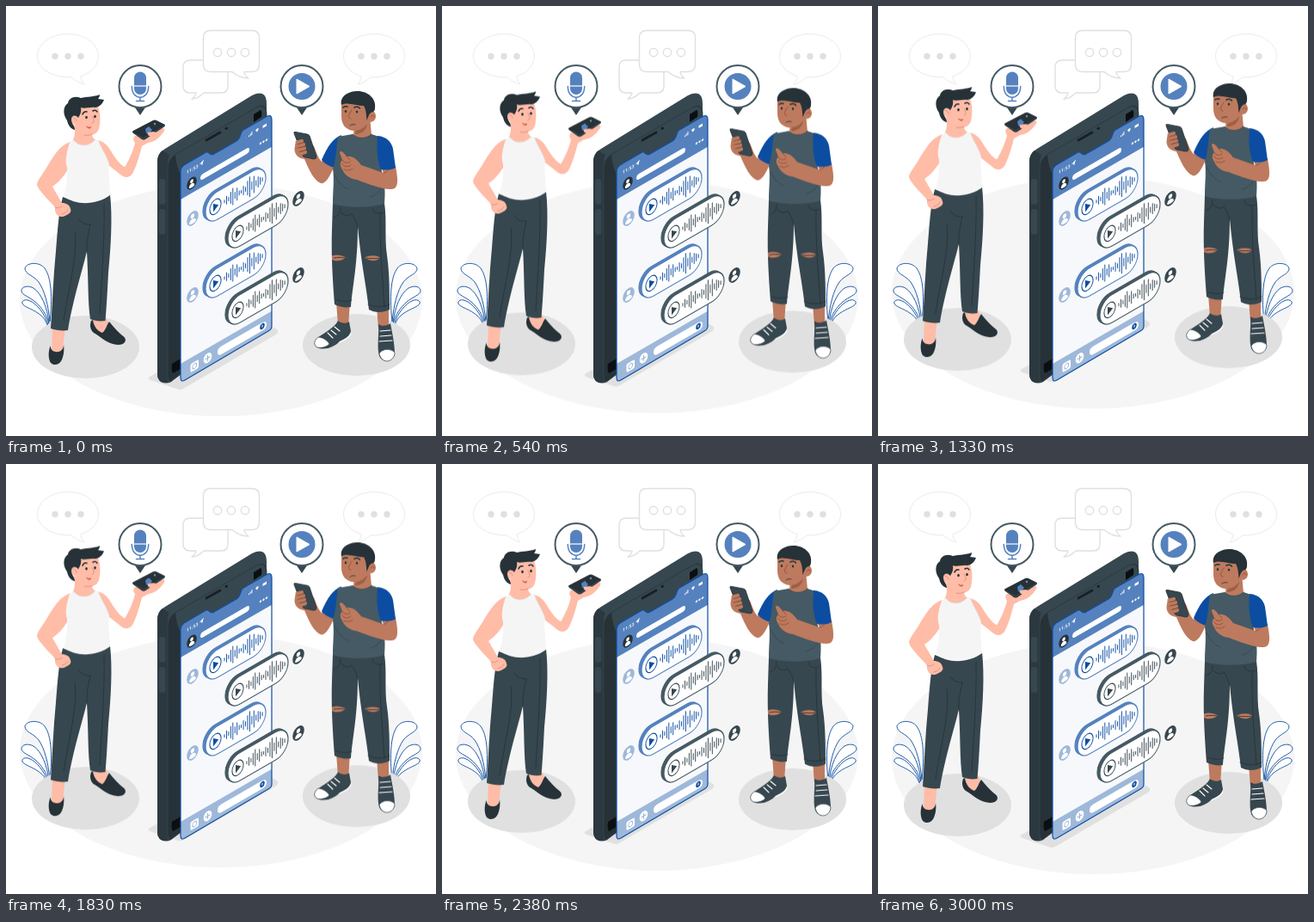
These frames come from a looping animation (500x500 px, 3040 ms). An HTML page:

```html
<!DOCTYPE html>
<html lang="en">
<head>
<meta charset="utf-8">
<title>Voice messages</title>
<style>
html, body { margin: 0; width: 100%; height: 100%; overflow: hidden; background: #fff; }
svg { display: block; width: 100vw; height: 100vh; }
.float { animation: float 3040ms linear infinite; }
@keyframes float {
  0%, 98.68%, 100% { transform: translateY(0); }
  49.34% { transform: translateY(-10px); }
}
.ink { fill: #263238; }
.slate { fill: #37474f; }
.steel { fill: #455a64; }
.navy { fill: #0c4da2; }
.blue { fill: #5582be; }
.pale { fill: #9eb8da; }
.white { fill: #fff; }
.shade { fill: #e0e0e0; }
.fair { fill: #ffbca7; }
.tan { fill: #bd7a5e; }
.line { fill: none; stroke: #263238; stroke-width: .8; stroke-linecap: round; stroke-linejoin: round; }
.slot { stroke: #172126; stroke-width: 3; }
.fold { stroke: #dc8a75; }
.crease { stroke: #8f4d36; }
.seam { stroke: #37474f; }
.brow { stroke-width: 1.5; }
.lace { stroke: #fff; stroke-width: 1.1; }
.bubble { fill: #fff; stroke: #ebebeb; stroke-width: 1; }
.bubble.main { stroke: #e0e0e0; stroke-width: 1.4; stroke-linejoin: round; }
.leaf { fill: #fff; stroke: #0c4da2; stroke-width: .9; }
.pin { fill: #fff; stroke: #455a64; stroke-width: 2; }
</style>
</head>
<body>
<svg viewBox="0 0 500 500">
  <defs>
    <g id="chat">
      <path class="bubble" d="M76 82.8C80 86 85 90 91 91C88 88 87 84 87 81.5C99 78 107.500 69 107.500 58.500C107.500 44 91.600 32.500 72 32.500S36.500 44 36.500 58.500S54 83.500 76 82.800Z"/>
      <g class="shade"><circle cx="57" cy="58.500" r="3.700"/><circle cx="72" cy="58.500" r="3.700"/><circle cx="87" cy="58.500" r="3.700"/></g>
    </g>
    <g id="plant" class="leaf">
      <path d="M51 367C54 340 53 316 45 305C39 297 24 298 22 305C22 312 32 313 38 321C45 331 49 347 51 367Z"/>
      <path d="M50 369C48 350 41 334 32 328C24 324 18 327 18 331C18 336 27 338 34 344C42 351 47 359 50 369Z"/>
      <path d="M49 370C44 356 35 346 28 343C22 340 18 343 19 346C21 350 30 352 37 357C43 361 46 365 48 371Z"/>
    </g>
    <g id="person"><circle cy="-2.600" r="2.500"/><path d="M-4.300 4.700C-4.300 -1 4.300 -1 4.300 4.700C2 6.300 -2 6.300 -4.300 4.700Z"/></g>
    <path id="pane" d="M203 193Q203 188 207 185L231 171Q234 169 236 171Q238 174 242 172L268 157Q272 154 273 149Q274 145 278 143L304 128Q309 126 309 132V372Q309 376 305 378L208 435Q203 438 203 432Z"/>
    <clipPath id="glass"><use href="#pane"/></clipPath>
  </defs>

  <use href="#chat"/>
  <use href="#chat" transform="matrix(-1 0 0 1 500 0)"/>
  <path class="bubble main" d="M214 63H250Q258 63 258 71V93Q258 101 250 101H230C226 105 221 108 216 108C219 106 220.500 104 221 101H214Q206 101 206 93V71Q206 63 214 63Z"/>
  <path class="bubble main" d="M238 28.500H286Q294.500 28.500 294.500 37V68Q294.500 76.500 286 76.500H277C277.500 80 279 82 282 84C274 84 268 81 263 76.500H238Q229.500 76.500 229.500 68V37Q229.500 28.500 238 28.500Z"/>
  <g class="bubble main"><circle cx="246" cy="54" r="4.700"/><circle cx="262" cy="54" r="4.700"/><circle cx="278" cy="54" r="4.700"/></g>

  <ellipse class="float" cx="250" cy="342" rx="234" ry="135" fill="#f5f5f5"/>
  <use href="#plant"/>
  <use href="#plant" transform="matrix(-1 0 0 1 500 0)"/>
  <g class="float shade">
    <ellipse cx="92.500" cy="396.500" rx="62.500" ry="36.500"/>
    <ellipse cx="407.500" cy="394" rx="62.500" ry="36"/>
    <path d="M167 431L290 362L315 376Q318 379 314 382L206 445Q202 447 198 445L168 435Q164 433 167 431Z"/>
  </g>

  <!-- handset -->
  <path class="slate" d="M176 181Q176 171 185 166L286 104Q303 96 303 114V370L204 428L192 437Q186 440 180 437Q176 434 176 428Z"/>
  <path fill="#2b383f" d="M176 181Q176 172 182 168L190 173Q188 177 188 184V438Q176 439 176 428Z"/>
  <path class="ink" stroke="#37474f" stroke-width=".8" d="M188 188Q188 178 197 172L290 118Q303 111 303 124V368L203 428L191 437Q188 437 188 430Z"/>
  <path class="slate" d="M197 173L290 119Q300 114 302 122V138L203 196Q198 186 197 173Z"/>
  <path fill="#0b0f12" d="M193 416L203 410V422L194 427Q192 424 193 416ZM288 126L296 121Q298 121 297 129L288 135Z"/>
  <path class="line slot" d="M233 156L249 147M256 142.500L256.500 142.200"/>
  <g class="slate"><rect x="178" y="201" width="7.500" height="30" rx="3.700"/><rect x="178" y="236" width="7.500" height="30" rx="3.700"/></g>

  <!-- screen -->
  <g clip-path="url(#glass)">
    <path fill="#f7f8fb" d="M200 120H312V440H200Z"/>
    <g transform="translate(203 190) skewY(-30)">
      <path class="blue" d="M-2 -8H108V35H-2Z"/>
      <path class="pale" d="M-2 226H108V252H-2Z"/>
    </g>
  </g>
  <use href="#pane" fill="none" stroke="#0c4da2" stroke-width="1.200"/>
  <g transform="translate(203 190) skewY(-30)">
    <text x="7" y="9.500" font-family="'Open Sans', sans-serif" font-size="5.300" font-weight="600" fill="#fff">11:53</text>
    <path class="white" d="M22 7L27 4L25 10L24.200 7.500Z"/>
    <path class="white" d="M79 8V6.500H80V8ZM80.700 8V5.300H81.700V8ZM82.400 8V4H83.400V8ZM87 5Q89 3 91 5L89 8ZM95.500 4.300H100V7.200H95.500Z"/>
    <g class="white"><circle cx="93" cy="23.500" r="1.200"/><circle cx="96.500" cy="23.500" r="1.200"/><circle cx="100" cy="23.500" r="1.200"/></g>
    <ellipse class="ink" cx="13" cy="23.500" rx="5.800" ry="6.800"/>
    <use href="#person" class="white" transform="translate(13 23.500) scale(.75 .85)"/>
    <rect class="white" x="23" y="20" width="57" height="6.500" rx="3"/>
    <g class="white">
      <rect x="11.500" y="233" width="9.500" height="10" rx="2"/>
      <ellipse cx="31.500" cy="237.500" rx="4.800" ry="5.600"/>
      <rect x="43" y="233" width="57" height="9.500" rx="4.500"/>
    </g>
    <ellipse cx="16.200" cy="238" rx="2.400" ry="2.800" fill="none" stroke="#9eb8da"/>
    <path d="M28.500 237.500H34.500M31.500 234V241" stroke="#9eb8da" stroke-width="1.200"/>
    <ellipse class="navy" cx="95" cy="237.300" rx="2.800" ry="3.400"/>
    <path d="M95 235.500V238.500" stroke="#fff" stroke-width="1"/>
  </g>
  <g id="messages" transform="translate(203 190) skewY(-30)"></g>

  <!-- left figure -->
  <g class="float">
    <path class="fair" d="M54 372L53 400C54 405 63 405 66 400L69 372ZM101 360L102 374C105 380 112 382 114 378L119 368L115 360Z"/>
    <path class="ink" d="M51.500 395C49 402 49 410 52 415C55 418 61 418 64 413C67 408 68 400 67 394C67 400 62 403 58 402C54 402 52 399 51.500 395ZM99 366C97 371 98 377 102 380C110 384 117 393 130 394C138 394 141 389 137.500 385C131 380 125 373 120 367C117 371 116 377 112 380C106 378 102 372 101 365Z"/>
    <path class="slate" d="M66 222C84 230 104 228 121 219C124 245 122 280 119 310C118 330 117 350 115.500 366C109 367 103 366 98 364C95 345 96 320 94 285C91 300 78 340 72 377C66 378 58 377 52 375C54 345 55 315 58 285C60 262 61 240 66 222Z"/>
    <path class="line" d="M94 287C93 276 96 264 98 254M80 262C84 290 72 330 67 366M114 230C115 270 111 320 109 358M98 254C90 254 86 251 84 247"/>
    <path class="fair" d="M75 158C64 161 57 172 50 183C44 194 37 202 36 207C36 213 52 228 57 234C56 240 60 246 66 245C72 243 77 240 75 236C74 231 70 229 65 229L54 210C60 206 68 198 73 188Z"/>
    <path class="line fold" d="M57 234C60 236 63 234 65 233M65 242C69 241 71 239 72 237"/>
    <path class="fair" d="M104 156C114 156 119 163 124 172C130 181 136 187 138.500 187C143 179 148 168 150 159C147 155 148 150 153 151C161 148 169 148 174 146C184 139 187 143 182 148C178 154 172 158 165 159L158 163C155 175 151 188 147 195C143 200 138 200 133 196C127 191 119 185 113 180Z"/>
    <path class="fair" d="M79 138C81 147 80 152 77 158C84 166 98 165 106 157C102 155 100 152 100 149Z"/>
    <path fill="#f5f5f5" d="M74 159L79 156C84 164 97 164 104 155L108 157C110 165 117 173 120 184C118 195 121 208 121 220C106 231 82 233 67 221C70 212 72 199 71 188C68 179 71 168 74 159Z"/>
    <path d="M79 156C84 164 97 164 104 155M108 157C110 165 117 173 120 184" fill="none" stroke="#dedede" stroke-width=".7"/>
    <path class="fair" d="M79 118C88 112 103 113 107 117C110 124 110 135 108 143C105 151 95 152 89 149C84 148 81 143 80 138C74 136 74 128 80 127Z"/>
    <path class="line fold" d="M91 150C95 151 98 150 100 149M78 130C80 130 82 132 82 134M100 128C102 132 104 135 100 136"/>
    <path class="ink" d="M80 144C75 143 72 138 71 133C66 126 66 117 72 113C73 107 80 104 87 107C94 105 102 106 109 103C109 105 108 107 107 108C110 108 112 109 114 109C112 114 109 117 104 118C98 117 91 120 87 118C88 123 86 127 84 130C81 126 76 127 76 132C76 137 80 139 80 144Z"/>
    <ellipse class="ink" cx="93.500" cy="129.500" rx="1.300" ry="1.700"/><ellipse class="ink" cx="103.500" cy="128.500" rx="1.300" ry="1.700"/>
    <path class="line brow" d="M89 126C90 123.500 92 122.500 94 123M101 122C103 120.800 105 121.500 106 123"/>
    <path d="M93 139C95 141 97 141 99 140C99 144 94 143 93 139Z" fill="#c95f52"/>
    <path class="ink" d="M148 145L171 133Q173 132 175 133L184 137.500Q186 138.500 184 140.500L162 155Q160 156 158 155L148 148Q146 146 148 145Z"/>
    <path fill="none" stroke="#455a64" stroke-width=".8" d="M149 148L160 154L184 139.500"/>
    <path class="blue" d="M162 143L166 140L170 144L166 149L163 148Z"/>
    <path class="fair" d="M165 147C169 146 173 146 175 147L170 152C166 152 164 149 165 147Z"/>
    <circle cx="173" cy="137" r="1.200" fill="#78909c"/>
  </g>

  <!-- right figure -->
  <g class="float">
    <path class="tan" d="M384 344L386 371L398 373L400 344ZM431 350L433 375H445V350Z"/>
    <path class="slate" d="M386 366C382 374 370 380 362 386C357 391 358 396 364 398C374 400 382 396 388 390C394 387 400 384 401 378L399 367C395 370 390 369 386 366ZM433 370C434 383 431 396 434 407C438 416 451 414 452 404C452 393 449 380 447 369C443 372 437 373 433 370Z"/>
    <path class="white" stroke="#37474f" stroke-width=".7" d="M363 385C368 385 374 389 376 393C372 397 366 398 362 397C357 394 358 389 363 385ZM434 404C438 398 448 398 452 403C452 414 437 418 434 404Z"/>
    <path class="line lace" d="M378 377L384 382M374 380L380 386M382 373L388 378M388 391C394 388 399 386 401 381M435 378L447 377M435 384L448 383M434 390L449 389"/>
    <path class="slate" d="M380 229C400 234 420 234 440 229C443 250 440 270 443 290C446 310 446 335 446 353C438 357 429 357 422 353C419 325 413 300 409 256C409 300 403 325 401 350C395 351 388 350 382 347C380 320 378 290 379 260Z"/>
    <path class="line" d="M409 258C408 252 405 246 402 242M389 234C390 240 386 245 381 246M426 235C427 241 433 242 439 240M435 242C434 275 438 320 440 350M402 242C398 246 392 243 390 240M383 341C390 344 397 344 402 342M421 347C430 351 439 350 446 347"/>
    <path class="tan" d="M379 290.500C384 288.500 391 289.500 395 292.500C390 297 383 297 379 295ZM417 292.500C423 289.500 431 289.500 435 292.500C431 298 423 297 417 292.500Z"/>
    <path class="line" d="M381 293C386 292 390 292 394 293M419 293C425 294 430 294 434 293"/>
    <path class="tan" d="M383 181C379 196 371 208 366 206C358 203 352 190 347 178C338 177 334 170 336 163C336 158 340 155 345 154L358 163C361 170 363 177 367 181L370 176Z"/>
    <path class="navy" d="M390 150C380 154 374 163 367 179C371 184 377 187 383 188L389 165Z"/>
    <path class="tan" d="M405 136L404 151C409 157 419 157 425 150L423 128Z"/>
    <path class="steel" d="M386 152L403 149C408 155 419 155 425 149L434 152C433 165 433 178 437 192C441 205 441 219 440 230C422 235 398 235 380 230C380 215 382 202 380 189C384 178 384 164 386 152Z"/>
    <path class="line seam" d="M403 149C408 155 419 155 425 149M382 196C386 205 392 211 398 213M437 212C433 218 428 221 423 222"/>
    <path class="tan" d="M436 187L453 186C455 198 457 208 452 212C444 216 424 208 408 202C400 201 394 197 391 190C388 186 388 182 391 179L388 171C388 168 391 168 396 175C403 174 408 178 413 185L439 194Z"/>
    <path class="line crease" d="M391 179C393 183 397 183 400 181M391 184C394 188 399 187 401 185M393 190C397 192 400 191 403 189M396 175L400 179M439 194C441 194 443 193 444 191"/>
    <path class="navy" d="M432 151C443 152 448 158 450 166L453 188C448 191 441 191 436 190C431 178 431 165 432 151Z"/>
    <path class="tan" d="M390 113C395 107 414 108 421 119C424 121 430 122 430 128C430 134 425 136 421 134C419 142 412 146 404 145C395 144 390 138 390 128Z"/>
    <path fill="#9d5f46" d="M407 145C413 144 417 141 420 137C419 144 414 149 406 149Z"/>
    <path class="ink" d="M390 115C388 105 398 99 409 99C421 99 431 108 429 119C429 122 427 123.500 425 123.500C422 125 421 130 419.500 133C419 128 419 121 416 116C407 116 397 111 390 115Z"/>
    <path class="line crease" d="M402 121C399 126 396 130 401 131M424 129C425 127 428 126 428 129"/>
    <ellipse class="ink" cx="395" cy="122.500" rx="1.200" ry="1.600"/><ellipse class="ink" cx="408" cy="123" rx="1.200" ry="1.600"/>
    <path class="line brow" d="M392 118C393 116.500 395 116.500 397 117M405 118C407 116.700 410 117 411.500 119"/>
    <path class="line" d="M400 139C402 137.500 404 137.500 406 138"/>
    <path class="slate" stroke="#263238" stroke-width=".8" d="M335 148Q334 146 337 146.500L350 149Q352 149 353 151L361 175Q361 178 358 178L348 176Q346 176 345 174Z"/>
    <path d="M338.500 158.500L344 157M338.500 163L346 161M339.500 167.500L347 165.500M342 172L348 170" fill="none" stroke="#bd7a5e" stroke-width="4.200" stroke-linecap="round"/>
    <path class="line crease" d="M339 160.800L346 159M339 165.200L348 163.200M341 169.700L348 167.700"/>
  </g>

  <!-- pins -->
  <path class="slate" d="M148 115L156 127L164 115ZM336 115L344 127L352 115Z"/>
  <circle class="pin" cx="156" cy="93.500" r="24.500"/>
  <circle class="pin" cx="344" cy="93.500" r="24.500"/>
  <rect class="blue" x="149" y="76.500" width="14" height="26.500" rx="7"/>
  <path d="M148 93H164" stroke="#fff" stroke-width="1.200"/>
  <path d="M146.300 93.500C146.300 110.500 165.700 110.500 165.700 93.500M156 106.500V110.500M151.500 110.500H160.500" fill="none" stroke="#5582be" stroke-width="1.500" stroke-linecap="round"/>
  <circle class="blue" cx="344" cy="93.500" r="15.500"/>
  <path class="white" stroke="#fff" stroke-linejoin="round" d="M338 85V102L353 93.500Z"/>
</svg>
<script>
const levels = [3, 9, 4, 13, 19, 7, 14, 5, 3, 10, 5, 16, 23, 9, 19, 6, 12, 8, 4];

function avatar(x, y, tone) {
  return `<ellipse class="${tone}" cx="${x}" cy="${y}" rx="6.8" ry="8"/>
    <use href="#person" class="white" transform="translate(${x} ${y}) scale(.9 1)"/>`;
}

function message(x, y, tone, mark) {
  const pill = (dx, dy, fill) =>
    `<rect x="${x + dx}" y="${y + dy}" width="70" height="32.500" rx="14" ry="16.250" fill="${fill}" stroke="${tone}" stroke-width="1.200"/>`;
  const mid = y + 16.2, px = x + 11.5;
  const bars = levels.map((h, i) => `M${x + 22 + i * 2.45} ${mid - h / 2}v${h}`).join("");
  return pill(-3, -3.3, tone) + pill(-1.5, -1.7, tone) + pill(0, 0, "#fff") +
    `<ellipse cx="${px}" cy="${mid}" rx="6.6" ry="8.4" fill="#fff" stroke="${mark}" stroke-width="1"/>
    <path d="M${px - 2.5} ${mid - 4.8}v9.600l6.200 -4.800z" fill="${mark}"/>
    <path d="${bars}" stroke="${mark}" stroke-width=".95" stroke-linecap="round"/>`;
}

document.getElementById("messages").innerHTML = [0, 89].map(y =>
  avatar(14, 65 + y, "pale") +
  message(29, 50.5 + y, "#5582be", "#0c4da2") +
  message(55, 96.5 + y, "#455a64", "#37474f") +
  avatar(137, 113 + y, "slate")
).join("");
</script>
</body>
</html>
```
